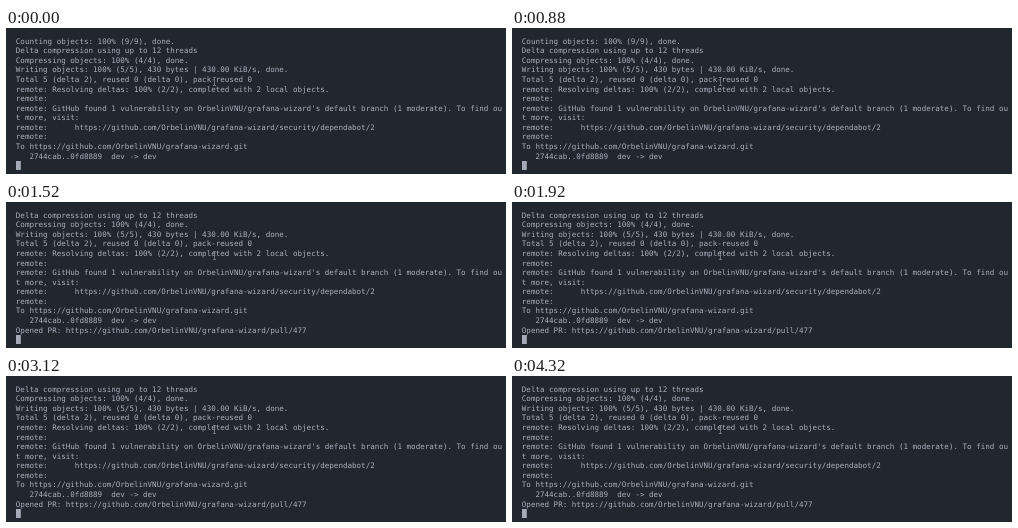
An HTML page for the animation above (8000 ms loop, 500x146 px).

```html
<!DOCTYPE html>
<html lang="en">
<head>
<meta charset="utf-8">
<title>Git push in a terminal</title>
<style>
  html, body { margin: 0; width: 100%; height: 100%; overflow: hidden; background: #22262f; }
  svg { display: block; width: 500px; height: 146px; }
  text {
    font: 7.55px "DejaVu Sans Mono", "Liberation Mono", monospace;
    fill: #a9b0bc;
    white-space: pre;
    text-rendering: geometricPrecision;
  }
</style>
</head>
<body>
<svg viewBox="0 0 500 146">
  <g id="screen"></g>
  <rect x="10" y="133" width="4.8" height="9" fill="#a4abb7"/>
  <path id="pointer" d="M207 49.5h3M208.5 49.5v8M207 57.5h3" fill="none" stroke="#8c929d" stroke-width=".7"/>
</svg>
<script>
const LOOP = 8000, OPENED = 960;
const ROWS = 13, LEFT = 9.8, BASELINE = 15.8, PITCH = 9.56;
const REPO = "https://github.com/OrbelinVNU/grafana-wizard";
const log = [
  "Counting objects: 100% (9/9), done.",
  "Delta compression using up to 12 threads",
  "Compressing objects: 100% (4/4), done.",
  "Writing objects: 100% (5/5), 430 bytes | 430.00 KiB/s, done.",
  "Total 5 (delta 2), reused 0 (delta 0), pack-reused 0",
  "remote: Resolving deltas: 100% (2/2), completed with 2 local objects.",
  "remote:",
  "remote: GitHub found 1 vulnerability on OrbelinVNU/grafana-wizard's default branch (1 moderate). To find ou",
  "t more, visit:",
  `remote:      ${REPO}/security/dependabot/2`,
  "remote:",
  `To ${REPO}.git`,
  "   2744cab..0fd8889  dev -> dev",
  `Opened PR: ${REPO}/pull/477`
];

const screen = document.getElementById("screen");
const rows = Array.from({ length: ROWS }, (_, i) => {
  const row = document.createElementNS("http://www.w3.org/2000/svg", "text");
  row.setAttribute("x", LEFT);
  row.setAttribute("y", BASELINE + i * PITCH);
  return screen.appendChild(row);
});

let shown = -1;
function draw(now) {
  // The new line scrolls the log up by one row.
  const first = now % LOOP < OPENED ? 0 : 1;
  if (first !== shown) {
    rows.forEach((row, i) => row.textContent = log[first + i]);
    shown = first;
  }
  requestAnimationFrame(draw);
}
draw(performance.now());
</script>
</body>
</html>
```
